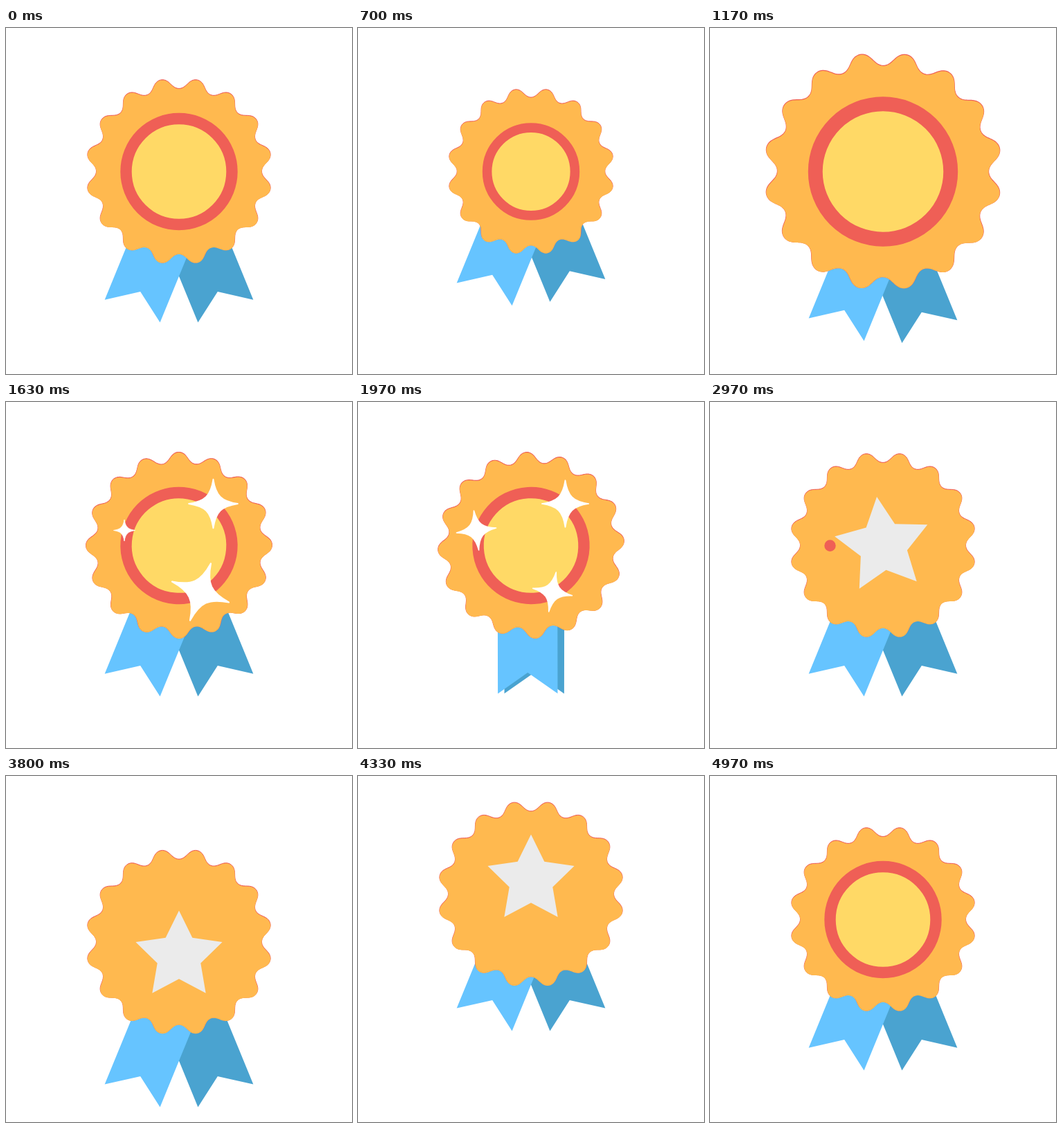
Animation, 500 px wide and 500 px high, one loop 5.01 s. Source, as an HTML page:

```html
<!DOCTYPE html>
<html lang="en">
<head>
<meta charset="utf-8">
<title>Award rosette</title>
<style>
  html, body { margin: 0; width: 100%; height: 100%; overflow: hidden; background: #fff; }
  svg { display: block; width: 100vw; height: 100vh; }
</style>
</head>
<body>
<svg viewBox="0 0 500 500">
  <defs>
    <path id="tail" d="M-43.2 0H43.2V164.4L0 134L-43.2 164.4Z"/>
    <path id="glint" stroke-width=".05" stroke-linejoin="round"/>
    <path id="scallop"/>
  </defs>
  <use id="darkTail" href="#tail" fill="#4aa3d0"/>
  <use id="lightTail" href="#tail" fill="#66c4ff"/>
  <use id="rim" href="#scallop" fill="#ef5f56" stroke="#ef5f56"/>
  <use id="seal" href="#scallop" fill="#ffb94f"/>
  <circle id="disc" r="76.5" fill="#ffd966"/>
  <circle id="ring" r="76.5" fill="none" stroke="#ef5f56" stroke-width="16.4" stroke-linecap="round" pathLength="360"/>
  <path id="star" fill="#ebebeb"/>
  <g fill="#fff" stroke="#fff">
    <use id="glintA" href="#glint"/>
    <use id="glintB" href="#glint"/>
    <use id="glintC" href="#glint"/>
  </g>
</svg>
<script>
const LOOP = 5010, CX = 250, CY = 207.5, TAIL_ANGLE = 22.3, TAIL_Y = 257;
const el = id => document.getElementById(id);
const span = (t, a, b) => Math.min(1, Math.max(0, (t - a) / (b - a)));
const quad = u => u < .5 ? 2 * u * u : 1 - 2 * (1 - u) ** 2;
const cubic = u => u < .5 ? 4 * u ** 3 : 1 - 4 * (1 - u) ** 3;

function ease(t, a, b) {
  const u = span(t, a, b);
  return u * u * (3 - 2 * u);
}

// Rises from 0 to 1 and falls back.
const swell = (t, a, peak, b) => ease(t, a, peak) - ease(t, peak, b);

// Winds up to `back`, rebounds to `out`, settles at 0.
const recoil = (t, a, wound, thrown, b, back, out) =>
  back * ease(t, a, wound) + (out - back) * ease(t, wound, thrown) - out * ease(t, thrown, b);

// Closed outline; angles run clockwise from the top.
function polar(count, radius, shift = () => 0) {
  const points = Array.from({ length: count }, (_, i) => {
    const a = i / count * 2 * Math.PI, r = radius(a, i), b = a + shift(a);
    return (r * Math.sin(b)).toFixed(2) + ' ' + (-r * Math.cos(b)).toFixed(2);
  });
  return 'M' + points.join('L') + 'Z';
}

// One concave side, turned four times.
function sparkle(tip, near, far) {
  let d = `M0 ${-tip}`;
  for (let i = 0; i < 4; i++) {
    const c = Math.round(Math.cos(i * Math.PI / 2)), s = Math.round(Math.sin(i * Math.PI / 2));
    const turn = (x, y) => `${x * c - y * s} ${x * s + y * c} `;
    d += 'C' + turn(near, -far) + turn(far, -near) + turn(tip, 0);
  }
  return d + 'Z';
}

function place(id, x, y, angle = 0, scale = 1) {
  const node = el(id);
  node.style.display = scale > .001 ? '' : 'none';
  node.setAttribute('transform', `translate(${x} ${y}) rotate(${angle}) scale(${scale})`);
}

function placeGlint(t, id, x, y, peak, mean, amp, tilt) {
  const wave = Math.cos(2 * Math.PI * (t - peak) / 1400);
  const shown = ease(t, 1170, 1600) - ease(t, 2350, 2650);
  place(id, x, y, tilt * (1 + wave) / 2, shown * (mean + amp * wave));
}

el('scallop').setAttribute('d',
  polar(640, a => 127 - 7.5 * Math.cos(16 * a), a => .0055 * Math.sin(32 * a)));
el('star').setAttribute('d', polar(10, (a, i) => i % 2 ? 32.9 : 65.8));
el('glint').setAttribute('d', sparkle(.97, .1, .32));

function render(t) {
  // Rosette: pop, spin, then a jump that star and tails follow late.
  const turn = time => 360 * cubic(span(time, 1098, 2670));
  const sealY = CY + recoil(t, 3233, 3700, 4240, 4750, 40, -40);
  const lagY = recoil(t, 3233, 3720, 4283, 4930, 59.5, -58);
  const sealScale = 1 + recoil(t, 0, 667, 1075, 1600, -.114, .303);
  place('rim', CX, sealY - .6, turn(t), sealScale);
  place('seal', CX, sealY, turn(t), sealScale);

  const bounce = time => TAIL_Y + lagY + recoil(time, 0, 613, 1070, 1560, -30, 30);
  const swing = TAIL_ANGLE - 45.9 * swell(t, 1633, 2320, 2830);
  place('darkTail', 255, bounce(t - 70), -swing);
  place('lightTail', 245, bounce(t), swing);

  // Centre: the disc shrinks and the ring unwinds, later both pop back.
  const pulse = 1 + recoil(t, 0, 667, 1085, 1600, -.18, .3);
  const popIn = 1.16 * ease(t, 4480, 4790) - .16 * ease(t, 4790, 4960);
  const returning = t > 4000;
  const shrink = 1 + .18 * ease(t, 2100, 2360) - 1.18 * ease(t, 2360, 2760);
  place('disc', CX, CY, 0, returning ? popIn : pulse * shrink);
  const trim = returning ? 0 : 360 * quad(span(t, 1970, 2985));
  place('ring', CX, CY, 180 + turn(t - 21), returning ? popIn : t < 3000 ? pulse : 0);
  el('ring').setAttribute('stroke-dasharray', trim ? `0 ${trim} ${Math.max(.01, 360 - trim)} 360` : 'none');
  el('ring').setAttribute('stroke-linecap', trim ? 'round' : 'butt');
  el('ring').setAttribute('stroke-dashoffset', trim ? .01 : 0);

  const starScale = 1.08 * ease(t, 2600, 2967) - .08 * ease(t, 2967, 3200) - ease(t, 4330, 4620);
  place('star', CX, CY + lagY, -130 * (1 - span(t, 2600, 3200)) ** 3, starScale);

  placeGlint(t, 'glintA', 299.5, 147, 1633, 34.7, 1.8, 0);
  placeGlint(t, 'glintB', 281, 274.5, 1633, 29, 16, 20);
  placeGlint(t, 'glintC', 171, 185.5, 2333, 30.5, 14.5, -15);
}

const start = performance.now();
function frame() {
  render((performance.now() - start) % LOOP);
  requestAnimationFrame(frame);
}
render(0);
requestAnimationFrame(frame);
</script>
</body>
</html>
```
